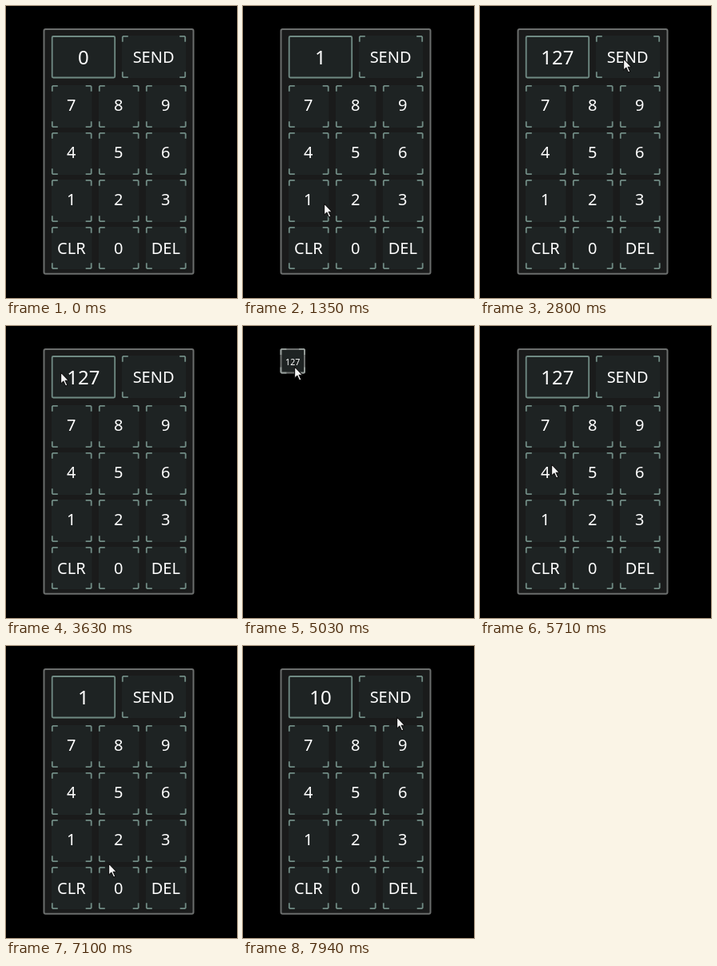
An HTML page for the animation above (8 s loop, 289 by 365 pixels).

```html
<!DOCTYPE html>
<html lang="en">
<head>
<meta charset="utf-8">
<title>Keypad</title>
<style>
  html, body { margin: 0; width: 100%; height: 100%; overflow: hidden; background: #000; }
  svg { display: block; width: 289px; height: 365px; }
  text { font: 20px "Noto Sans", "Open Sans", sans-serif; fill: #fff; text-anchor: middle; }
  .panel { fill: #1a1b1b; stroke: #6b6e6d; stroke-width: 2; }
  .face { fill: #1e2323; }
  .lines { stroke: #708b84; stroke-width: 1.8; }
  .corners { fill: none; }
  .flash { fill: #465a55; opacity: 0; }
  #value { font-size: 24px; }
  #mini text { font-size: 10.6px; }
  #mini .corners { stroke: #969e9b; }
  #cursor { fill: #f4f4f4; stroke: #111; stroke-width: 1.1; stroke-linejoin: round; }
</style>
</head>
<body>
<svg viewBox="0 0 289 365">
  <g id="pad">
    <rect class="panel" x="47.5" y="29" width="187" height="305.7" rx="2"/>
    <rect class="face lines" x="57.7" y="38" width="78.5" height="51.5" rx="1.5"/>
    <text id="value" x="96.9" y="73">0</text>
  </g>
  <g id="mini">
    <rect class="panel" x="47.5" y="29" width="29.5" height="29.5" rx="1.5" style="fill:#1e2323"/>
    <text x="62.2" y="49">127</text>
  </g>
  <path id="cursor" d="M.6 .8V15.2L3.9 12.2L6.6 18L8.9 17L6.2 11.2H10.3Z"/>
</svg>
<script>
const LOOP = 8000, START = 730, TICK = 69.3, FADE = 2;
const $ = id => document.getElementById(id);
const keys = {};

function corners(x, y, w, h) {
  const arm = 7, inset = .8;
  const d = [1, -1].flatMap(sx => [1, -1].map(sy => {
    const cx = sx > 0 ? x + inset : x + w - inset;
    const cy = sy > 0 ? y + inset : y + h - inset;
    return `M${cx + sx * arm} ${cy}H${cx + sx}L${cx} ${cy + sy}V${cy + sy * arm}`;
  })).join('');
  return `<path class="lines corners" d="${d}"/>`;
}

function addKey(label, x, y, w, baseline) {
  const h = 53, mid = x + w / 2 - .4;
  $('pad').insertAdjacentHTML('beforeend', `
    <rect class="face" x="${x}" y="${y}" width="${w}" height="${h}"/>
    <rect class="flash" id="key${label}" x="${x + 4}" y="${y + 4}" width="${w - 8}" height="${h - 8}"/>
    ${corners(x, y, w, h)}
    <text x="${mid}" y="${y + baseline}">${label}</text>`);
  keys[label] = { flash: $('key' + label), at: [mid + 4, y + h / 2 + 2] };
}

addKey('SEND', 145, 37, 80, 34);
['7 8 9', '4 5 6', '1 2 3', 'CLR 0 DEL'].forEach((row, j) =>
  row.split(' ').forEach((label, i) =>
    addKey(label, 57 + 59 * i, 99 + 59 * j, 50.5, j < 3 ? 32 : 34)));
$('mini').insertAdjacentHTML('beforeend', corners(46.6, 28.1, 31.3, 31.3));

// The session is recorded as pointer legs, key presses and one fold
let now = 0, spot = [264, 287], fold, unfold;
const legs = [], presses = [];

function move(to, ticks) {
  legs.push({ start: now, ticks, from: spot, to });
  now += ticks;
  spot = to;
}
const rest = ticks => move(spot, ticks);
function press(label, travel = 0) {
  if (travel) move(keys[label].at, travel);
  presses.push({ label, at: now });
  rest(1);
}

press('1', 7);
press('2', 4);
press('7', 5);
move([124, 112], 1);
move(keys.SEND.at, 2);
rest(2);
press('SEND');
rest(4);
move([68, 57], 13);
rest(2);
fold = now;
rest(4);
move([61, 48], 5);
rest(8);
move([64, 50], 1);
rest(3);
unfold = now;
move([89, 172], 7);
press('CLR', 6);
press('1', 8);
move([128, 271], 4);
press('0', 3);
move(keys.SEND.at, 4);
rest(1);
press('SEND');
rest(1);
move([192, 88], 1);

function pointerAt(n) {
  const leg = legs.find(l => n <= l.start + l.ticks) || legs[legs.length - 1];
  const k = Math.min(1, Math.max(0, (n - leg.start) / leg.ticks));
  return leg.from.map((a, i) => Math.round(a + (leg.to[i] - a) * k));
}

function valueAt(n) {
  return presses.filter(p => p.at <= n).reduce((value, { label }) => {
    if (label === 'SEND') return value;
    if (label === 'CLR') return '0';
    return value === '0' ? label : value + label;
  }, '0');
}

const show = (el, on) => { el.style.display = on ? '' : 'none'; };

function draw(t) {
  const n = Math.floor((t - START) / TICK + .2);
  const small = n >= fold && n < unfold;
  show($('pad'), !small);
  show($('mini'), small);
  show($('cursor'), n >= 0);
  $('cursor').setAttribute('transform', `translate(${pointerAt(n)})`);
  $('value').textContent = valueAt(n);
  for (const label in keys) {
    const hit = presses.find(p => p.label === label && n >= p.at && n < p.at + FADE);
    keys[label].flash.style.opacity = hit ? 1 - (n - hit.at) / FADE : 0;
  }
}

const origin = performance.now();
function frame() {
  draw((performance.now() - origin) % LOOP);
  requestAnimationFrame(frame);
}
frame();
</script>
</body>
</html>
```
